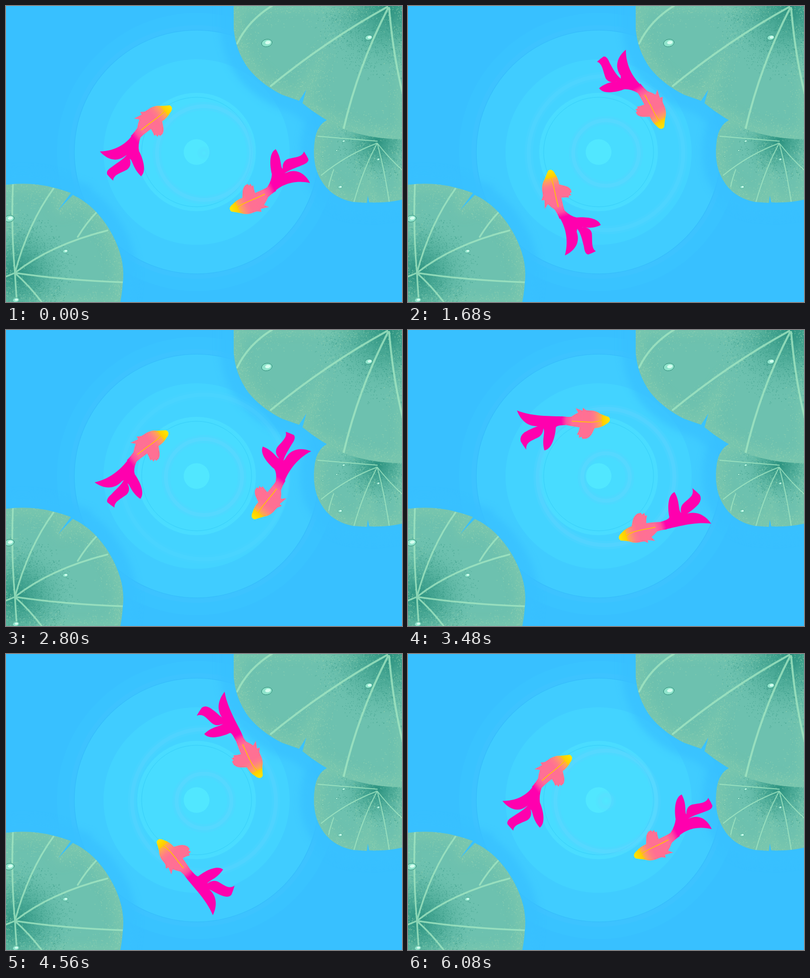
An HTML page with a canvas for the animation above (6120 ms loop, 800 px wide and 600 px high).

```html
<!DOCTYPE html>
<html lang="en">
<head>
<meta charset="utf-8">
<title>Lily pond</title>
<style>
  html, body { margin: 0; width: 100%; height: 100%; overflow: hidden; background: #38c1ff; }
  canvas { display: block; width: 800px; height: 600px; }
</style>
</head>
<body>
<canvas id="pond" width="800" height="600"></canvas>
<script>
const LOOP = 6120, STEP = 40, SWIM = 3060, BODY = 95;
const ctx = document.getElementById('pond').getContext('2d');

let seed = 7;
const rnd = () => (seed = (seed * 16807) % 2147483647) / 2147483647;

const polar = (o, len, deg) => {
  const r = deg * Math.PI / 180;
  return [o[0] + len * Math.cos(r), o[1] + len * Math.sin(r)];
};

function disc(g, x, y, r, fill) {
  g.fillStyle = fill;
  g.beginPath();
  g.arc(x, y, r, 0, 7);
  g.fill();
}

function ring(g, x, y, r, width, stroke) {
  g.strokeStyle = stroke;
  g.lineWidth = width;
  g.beginPath();
  g.arc(x, y, r, 0, 7);
  g.stroke();
}

// ---------- still scenery ----------

const pads = [
  {
    shape: 'M640 237Q628 248 624 270Q617 320 636 352Q656 388 700 397L729 399L731 384L734 398Q772 400 810 390V230H650Z',
    box: [615, 230, 185, 175], heart: [750, 274], reach: 75, dots: 5000, vein: 2,
    veins: 'M750 274L630 264M750 278Q690 300 637 343M750 278Q722 330 703 397M750 278Q764 330 774 396M750 278Q775 310 802 334M662 332Q655 350 652 366',
    drops: [[682, 274, 3], [640, 305, 1.5], [668, 293, 2], [752, 311, 3], [675, 367, 4]]
  },
  {
    shape: 'M460 -10V45Q463 90 490 127Q516 159 558 180L592 192L607 169L599 197Q636 228 684 250Q740 271 810 270V-10Z',
    box: [455, 0, 345, 275], heart: [772, 2], reach: 130, dots: 16000, vein: 4,
    veins: 'M770 2Q650 68 535 162M772 4Q712 120 682 249M774 4Q782 100 802 180M540 -2Q490 28 467 76',
    drops: [[527, 75, 10], [733, 64, 7]]
  },
  {
    shape: 'M-10 364Q45 355 95 368Q115 373 131 379L105 414L135 383Q180 404 210 455Q242 510 236 560Q235 580 229 610H-10Z',
    box: [0, 355, 240, 245], heart: [18, 541], reach: 110, dots: 10000, vein: 3.4,
    veins: 'M18 541Q10 450 14 362M18 541Q45 440 96 370M18 541Q90 484 205 455M145 468Q162 440 183 418M18 541Q120 556 236 560M18 541Q50 570 75 604M18 541L22 604M18 541L-4 550',
    drops: [[7, 431, 9], [120, 497, 5], [20, 596, 6]]
  }
];

function drawDrop(g, [x, y, r]) {
  g.beginPath();
  g.ellipse(x, y, r * 1.08, r * .75, -.2, 0, 7);
  g.fillStyle = '#8fe3cb';
  g.fill();
  g.strokeStyle = r > 6 ? '#2f8b78' : '#57ad99';
  g.lineWidth = 1;
  g.stroke();
  g.beginPath();
  g.ellipse(x + r * .2, y - r * .1, r * .55, r * .35, -.2, 0, 7);
  g.fillStyle = '#d6fff0';
  g.fill();
}

function drawPad(g, pad) {
  const path = new Path2D(pad.shape);
  const [hx, hy] = pad.heart, [bx, by, bw, bh] = pad.box;
  g.save();
  g.clip(path);
  g.fillStyle = '#6dc1af';
  g.fillRect(0, 0, 800, 600);

  g.filter = 'blur(12px)';
  g.strokeStyle = 'rgba(140,207,172,.4)';
  g.lineWidth = 30;
  g.stroke(path);
  g.filter = 'none';

  const shade = g.createRadialGradient(hx, hy, 0, hx, hy, pad.reach);
  shade.addColorStop(0, 'rgba(38,142,124,.95)');
  shade.addColorStop(.45, 'rgba(58,158,138,.55)');
  shade.addColorStop(1, 'rgba(90,180,160,0)');
  g.fillStyle = shade;
  g.fillRect(0, 0, 800, 600);

  // grain: pale towards the rim, dark towards the heart
  for (let i = 0; i < pad.dots; i++) {
    const x = bx + rnd() * bw, y = by + rnd() * bh, size = 1 + rnd();
    g.lineWidth = 110 * rnd();
    if (rnd() < .35 && g.isPointInStroke(path, x, y)) g.fillStyle = 'rgba(152,214,180,.5)';
    else if (Math.hypot(x - hx, y - hy) < pad.reach * 1.2 * rnd()) g.fillStyle = 'rgba(52,150,130,.4)';
    else continue;
    g.fillRect(x, y, size, size);
  }

  g.strokeStyle = '#a2e6c2';
  g.lineWidth = pad.vein;
  g.lineCap = 'round';
  g.globalAlpha = .8;
  g.stroke(new Path2D(pad.veins));
  g.globalAlpha = 1;
  pad.drops.forEach(d => drawDrop(g, d));
  g.restore();
}

function drawScene() {
  const layer = document.createElement('canvas');
  layer.width = 800;
  layer.height = 600;
  const g = layer.getContext('2d');
  g.fillStyle = '#38c0ff';
  g.fillRect(0, 0, 800, 600);
  disc(g, 385, 296, 282, '#39c3ff');
  disc(g, 385, 296, 257, '#3dc3ff');
  disc(g, 385, 296, 247, '#40ccff');
  disc(g, 385, 296, 188, '#43d3ff');
  disc(g, 385, 296, 120, '#48dcff');
  ring(g, 385, 296, 247, 1.5, 'rgba(50,185,250,.6)');
  ring(g, 385, 296, 117, 5, 'rgba(90,220,255,.15)');
  ring(g, 385, 296, 111, 1, 'rgba(45,195,245,.55)');
  disc(g, 385, 296, 26, '#51e7ff');

  g.filter = 'blur(7px)';
  g.strokeStyle = 'rgba(57,192,255,.75)';
  g.lineWidth = 56;
  pads.forEach(p => g.stroke(new Path2D(p.shape)));
  g.filter = 'none';
  pads.forEach(p => drawPad(g, p));
  return layer;
}

// ---------- ripples ----------

function drawRipples(t) {
  const first = (5 + .09 * t) % 90;
  for (const r of [first, first + 90]) {
    const a = Math.min(1, (190 - r) / 60, r / 20);
    if (a <= 0) continue;
    ring(ctx, 400, 298, r, 17, `rgba(88,208,255,${.3 * a})`);
    ring(ctx, 400, 298, r, 8, `rgba(98,212,255,${.4 * a})`);
  }
}

// ---------- fish ----------

// time, nose angle and radius about the pond's middle, direction nose to tail
const routes = [
  [[0, -119.6, 117, 141], [840, -71.7, 130.6, 178], [1680, -26.6, 134, 241],
   [2800, 34.2, 128, 307.7], [3480, 72.9, 119, 344.7], [4560, 140.6, 108.7, 408.8]],
  [[0, 59.4, 119.7, -25.5], [840, 111.7, 110.9, 12.7], [1680, 166.4, 106, 76],
   [2800, 237, 119, 142], [3480, 276.8, 126.9, 179.4], [4560, 334.6, 135, 242]]
];
// time, body bend, root turn, angles of outer, middle and inner lobe, curl, outer length
const strokes = [
  [0, -24, -38, 31, -21, -67, 0, 67],
  [420, 15, -3, 17, -47, -74, -13, 75],
  [840, 20, 28, 55, -12, -27, -18, 81],
  [1500, 3, 3, 13, -45, -75, -8, 74],
  [1680, -27, -38, 23, -27, -70, 5, 69],
  [2800, -24, -34, 19, -32, -76, 1, 71],
  [3020, -24, -37, 35, -17, -60, 0, 64]
];

// Smooth curve through repeating keys; `gain` is what one round adds to each column.
function sample(keys, t, gain) {
  const n = keys.length;
  const key = j => {
    const lap = Math.floor(j / n);
    return keys[j - lap * n].map((v, c) => v + lap * (gain[c] || 0));
  };
  let i = n - 1;
  while (keys[i][0] > t) i--;
  const [p, a, b, q] = [key(i - 1), key(i), key(i + 1), key(i + 2)];
  const h = b[0] - a[0], u = (t - a[0]) / h;
  const slope = (l, m, r, c) => {
    const d0 = m[0] - l[0], d1 = r[0] - m[0];
    return ((m[c] - l[c]) / d0 * d1 + (r[c] - m[c]) / d1 * d0) / (d0 + d1);
  };
  return a.map((v, c) => c === 0 ? t :
    v + (b[c] - v) * u * u * (3 - 2 * u)
    + h * u * (1 - u) * ((1 - u) * slope(p, a, b, c) - u * slope(a, b, q, c)));
}

// Traces M, L, Q and C commands through a mapping of local points.
function trace(path, map, d) {
  const verbs = { M: 'moveTo', L: 'lineTo', Q: 'quadraticCurveTo', C: 'bezierCurveTo' };
  for (const [, verb, args] of d.matchAll(/([MLQC])([^MLQC]*)/g)) {
    const v = args.trim().split(/[ ,]+/).map(Number), out = [];
    for (let i = 0; i < v.length; i += 2) out.push(...map(v[i], v[i + 1]));
    path[verbs[verb]](...out);
  }
}

function drawFish(route, t) {
  const [, around, radius, axis] = sample(route, t, [LOOP, 360, 0, 360]);
  const [, bend, turn, outer, middle, inner, curl, reach] = sample(strokes, t % SWIM, [SWIM]);
  const nose = polar([392, 308], radius, around);
  const stem = polar(nose, BODY, axis);
  const root = polar(stem, 20, axis + turn);

  const body = (s, w) => polar(
    polar(nose, s, axis + bend * (s / 2 / BODY - .5)), w, axis + bend * (s / BODY - .5) - 90);
  const lobe = (deg, scale = 1, sway = 0) => (x, y) => {
    const off = sway * Math.sin(Math.PI * Math.min(1, Math.max(0, x / 79)));
    return polar(polar(root, x * scale, axis + deg), y + off, axis + deg - 90);
  };
  const base = lobe(turn), top = lobe(outer, reach / 70);
  const mid = lobe(middle, 1, curl), low = lobe(inner);

  const paint = ctx.createLinearGradient(...nose, ...polar(nose, 104, axis));
  [[0, '#ffe600'], [.14, '#ffcc00'], [.15, '#ffb436'], [.21, '#ff9a64'], [.3, '#ff7c88'],
   [.38, '#ff7092'], [.72, '#ff6f96'], [.84, '#ff4aa2'], [.94, '#ff00ae'], [1, '#ff00ae']]
    .forEach(s => paint.addColorStop(...s));
  ctx.fillStyle = paint;

  const tail = new Path2D();
  trace(tail, body, 'M88 -8');
  tail.bezierCurveTo(...base(-6, -10), ...top(36, 4), ...top(70, 0));
  trace(tail, top, 'C57 19 38 27 18 16');
  trace(tail, mid, 'L20 -2C32 -4 42 -10 56 -16Q69 -23 74 -17Q77 -9 79 0C68 -5 60 4 46 13C38 17 30 14 24 7');
  trace(tail, low, 'C26 -7 42 -12 62 0C55 15 26 13 12 10');
  tail.quadraticCurveTo(...base(-6, 9), ...body(88, 9));
  tail.closePath();
  ctx.fill(tail);

  const skin = new Path2D();
  trace(skin, body, 'M-1 0Q-1 -6 3 -7Q10 -10 17 -14Q25 -21 36 -22Q42 -22 47 -23L54 -28L55 -22L70 -27'
    + 'L64 -18Q72 -14 78 -9Q88 -7 98 -8L98 9Q88 8 78 10Q70 11 60 12'
    + 'L62 20L65 27L61 27L61 33L56 31L55 35L48 35Q40 32 36 24Q33 18 31 14Q18 14 8 8Q0 5 -1 0');
  ctx.fill(skin);

  const line = new Path2D();
  trace(line, body, 'M15 -1C30 4 45 1 76 0');
  ctx.strokeStyle = '#ffc400';
  ctx.lineWidth = 1.6;
  ctx.stroke(line);
}

const scene = drawScene();

function frame(now) {
  const t = Math.floor((now % LOOP) / STEP) * STEP;
  ctx.drawImage(scene, 0, 0);
  drawRipples(t);
  routes.forEach(r => drawFish(r, t));
  requestAnimationFrame(() => frame(performance.now() - start));
}

const start = performance.now();
frame(0);
</script>
</body>
</html>
```
